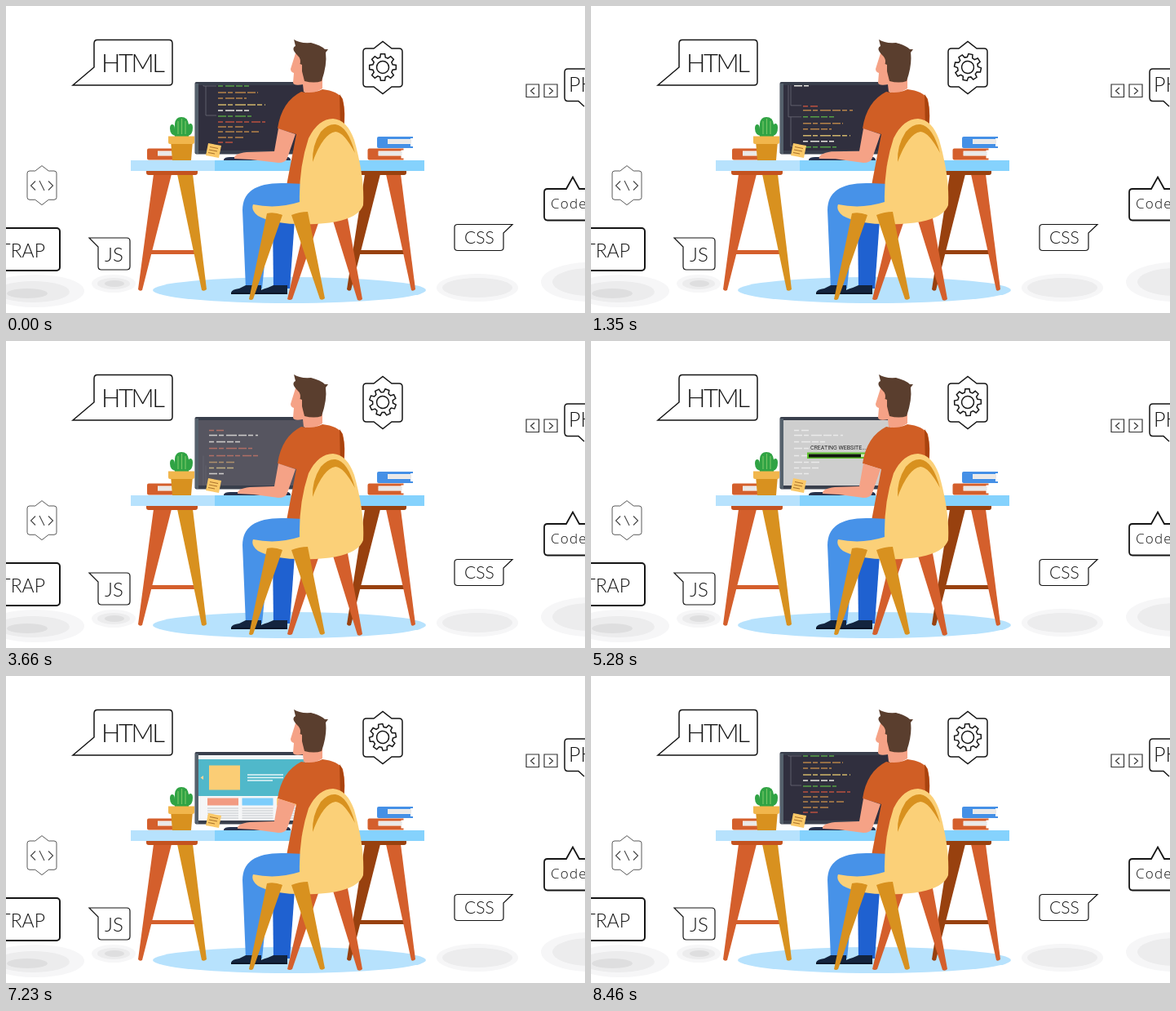
Write an HTML page that moves like this. It is 710x376 px and loops after 8530 ms.

```html
<!DOCTYPE html>
<html lang="en">
<head>
<meta charset="utf-8">
<style>
  html, body { margin: 0; width: 100%; height: 100%; overflow: hidden; background: #fff; }
  svg { display: block; width: 710px; height: 376px; }
  .line { fill: none; stroke: #151515; stroke-width: 1.5; }
  .label { font: 300 24px Lato, "Open Sans", sans-serif; fill: #151515; }
</style>
</head>
<body>
<svg viewBox="0 0 710 376">
  <defs>
    <clipPath id="screen"><path d="M236 97H366V177H236Z"/></clipPath>
    <path id="badge" d="M442 52H451L462 43.500 473 52H482Q486 52 486 56V95Q486 99 482 99H473L462 107.500 451 99H442Q438 99 438 95V56Q438 52 442 52Z"/>
    <g id="book">
      <path d="M2 0H44V2H41V12H44V14H2Q0 14 0 12V2Q0 0 2 0Z"/>
      <path d="M13 3H42V9H13Z" fill="#f3f1ee"/>
      <path d="M13 5H42M13 7H42" stroke="#d3d5d8" stroke-width=".6"/>
    </g>
  </defs>

  <!-- floor and soft shadows -->
  <g fill="#f6f6f7">
    <ellipse cx="36" cy="349" rx="60" ry="20"/>
    <ellipse cx="132" cy="340" rx="27" ry="11"/>
    <ellipse cx="578" cy="345" rx="50" ry="17"/>
    <ellipse cx="716" cy="338" rx="60" ry="24"/>
  </g>
  <g fill="#ececed">
    <ellipse cx="33" cy="350" rx="45" ry="13"/>
    <ellipse cx="132" cy="340" rx="20" ry="7"/>
    <ellipse cx="578" cy="345" rx="43" ry="12"/>
    <ellipse cx="716" cy="338" rx="46" ry="17"/>
  </g>
  <g fill="#dededf">
    <ellipse cx="26" cy="352" rx="25" ry="6"/>
    <ellipse cx="133" cy="340" rx="12" ry="4"/>
  </g>
  <ellipse cx="347.500" cy="348" rx="167.500" ry="16" fill="#b7e2fd"/>

  <!-- bubbles -->
  <g class="line">
    <path d="M82 97 108 75V46Q108 41.500 112 41.500H200Q204 41.500 204 46V93Q204 97 200 97Z"/>
    <use href="#badge"/>
    <use href="#badge" transform="translate(-302.500 163) scale(.75)" stroke="#555" stroke-width="1.300"/>
    <path d="M36 214.500 30.500 220 36 225.500M52 214.500 57.500 220 52 225.500M41 214 47 226" stroke="#444" stroke-width="1.100"/>
    <path d="M102 284H148Q152 284 152 288V319Q152 323 148 323H117Q113 323 113 319V295Z" stroke-width="1.200"/>
    <rect x="-20" y="272" width="86" height="52" rx="4" stroke-width="2"/>
    <path d="M554 267.500H621L610 278V296Q610 299.500 606 299.500H554Q550 299.500 550 296V271Q550 267.500 554 267.500Z" stroke-width="1.200"/>
    <path d="M720 262.500H664Q660 262.500 660 258V228Q660 224 664 224H687L695 209.500 703 224H720" stroke-width="1.800"/>
    <path d="M720 77H689Q685 77 685 81V112Q685 116.500 689 116.500H702L709 123"/>
    <path d="M638 96H653.500V111.500H638ZM660 96H676V111.500H660ZM648 100 643.500 104 648 108M666 100 670.500 104 666 108" stroke="#333" stroke-width="1.200"/>
  </g>
  <g class="label">
    <text x="117" y="81" style="font-size:31px" textLength="78">HTML</text>
    <text x="121" y="313">JS</text>
    <text x="48" y="308" text-anchor="end" style="font-size:23px">TRAP</text>
    <text x="562" y="291" style="font-size:21px">CSS</text>
    <text x="690" y="105" style="font-size:25px">PHP</text>
    <text x="668" y="248" style="font:300 17px 'Open Sans',sans-serif;letter-spacing:1.200px">Code</text>
  </g>
  <g id="gear" class="line">
    <path id="teeth"/>
    <circle r="7.500"/>
  </g>

  <!-- desk legs -->
  <path d="M170 299H234V304H170ZM181 206H203L167 348Q164 350 162 347Z" fill="#d45f2c"/>
  <path d="M210 206H229L246 347Q243 350 240 348Z" fill="#d8911f"/>
  <path d="M172 202H235V204Q235 207 232 207H175Q172 207 172 204Z" fill="#c4521f"/>
  <path d="M426 299H493V304H426ZM440 206H459L423 348Q420 350 418 347Z" fill="#98410f"/>
  <path d="M466 206H484L502 347Q499 350 497 348Z" fill="#d45f2c"/>
  <path d="M432 202H491V204Q491 207 488 207H432Z" fill="#98410f"/>

  <!-- monitor -->
  <rect x="231.500" y="93" width="135" height="88.500" rx="2" fill="#393f4c"/>
  <path d="M232 95V179Q232 181 234 181H236V95Z" fill="#55616c"/>
  <g clip-path="url(#screen)">
    <rect x="236" y="97" width="130" height="80" fill="#302f3e"/>
    <rect id="light" x="236" y="97" width="130" height="80" fill="#cecece"/>
    <g id="code" stroke-width="1.500"></g>
    <g id="pale" stroke-width="1.500"></g>
    <g id="loader">
      <text x="269" y="133" font-family="Roboto,sans-serif" font-size="7" fill="#222">CREATING WEBSITE...</text>
      <rect x="265" y="136.500" width="75" height="7.500" fill="#5fc12f"/>
      <rect x="267" y="138.500" width="71" height="3.500" fill="#cfe9c0"/>
      <rect id="bar" x="267" y="138.500" height="4" fill="#10150d"/>
    </g>
    <g id="site">
      <rect x="236" y="97" width="130" height="80" fill="#f5f6f7"/>
      <path id="hero" d="M236 102H366V147H236Z" fill="#50b8ca"/>
      <g id="banner">
        <path d="M249 109.500H287V139.500H249Z" fill="#fbcd75"/>
        <path d="M242 122 238.500 124.500 242 127Z" fill="#f7d59a"/>
        <path d="M296 121H340M296 124.500H340M296 128H327" stroke="#e5f6f8" stroke-width="1.300"/>
      </g>
      <g id="cards"></g>
    </g>
  </g>
  <path d="M267 188Q268 185 275 185H346Q349 186 349 189H267Z" fill="#26324c"/>

  <!-- desk top and things on it -->
  <path d="M153 189H257V202H153Z" fill="#b7e2fd"/>
  <path d="M256 189H513V202H256Z" fill="#85d2fd"/>
  <use href="#book" x="173" y="174.500" fill="#d45f2c"/>
  <use href="#book" x="455" y="160" fill="#4590e6"/>
  <use href="#book" x="443.500" y="174.500" fill="#d45f2c"/>
  <g fill="#30a344">
    <path d="M207 160V144Q208 136 215 136 223 136 224 145V160Z"/>
    <path d="M201 150Q201 145 204 145 207 145 207 151L212 153V159Q201 160 201 150ZM229 149Q229 144 226 144 223 144 223 151V159Q229 158 229 149Z"/>
  </g>
  <path d="M211 141V157M215.500 138V157M220 141V157" stroke="#76c565" stroke-width="1.200"/>
  <path d="M202 165H229L227 189H204Z" fill="#d8911f"/>
  <path d="M199 159.500H231V167Q231 169 229 169H201Q199 169 199 167Z" fill="#f1b64c"/>
  <path d="M248 168 264 171 261 186 245 183Z" fill="#fbc968"/>
  <path d="M250 172.500 260 174.500M249 176 259 178M248 179.500 256 181" stroke="#a9712b"/>

  <!-- rear chair legs and the man -->
  <path d="M368 263H384L351 359Q348 361 345 359ZM400 260H419L437 359Q434 362 431 360Z" fill="#d45f2c"/>
  <g id="cup">
    <path d="M327 113Q325 118 331 122L339 149 352 146 342 116 334 111Z" fill="#f5a286"/>
    <path d="M324.500 89 341 92.500Q344 93 343 96L336 114Q335 117 332 116L320 112Q317 111 318 108Z" fill="#f7f7f8"/>
    <path d="M325 89 343 93 342 97 324 92Z" fill="#dfe1e5"/>
    <path d="M328 117Q330 113 337 114L341 111 342 118 333 123Z" fill="#f5a286"/>
  </g>
  <path d="M355 58 349 77Q349 81 353 82L352 94Q353 98 364 96L365 105Q376 109 388 101V82L366 58Z" fill="#f5a286"/>
  <path d="M353 41Q360 46 374 45 386 48 391 53L395 53 392 57Q394 72 387 92 378 95 366 92L363 80 360 73Q363 65 357 60 349 52 355 49Z" fill="#5a3e2e"/>
  <path d="M363 72Q357 69 357 76 358 83 363 82Z" fill="#f5a286"/>
  <path d="M362 105Q376 108 388 102 407 104 413 114 417 132 414 150L405 225H343L356 157 333 150Q338 117 362 105Z" fill="#d05e25"/>
  <path d="M409 108Q417 118 414 150L410 152Z" fill="#a9430e"/>
  <path id="arm" fill="#f5a286"/>
  <path d="M327 262H354L348 346H328Z" fill="#1f61d0"/>
  <path d="M343 217Q290 215 290 250L294 346H314L323 257H365V218Z" fill="#4792e8"/>
  <path d="M276 351Q277 347 286 346L294 342H313V352H276ZM310 351Q312 347 321 345L328 342H345V352H310Z" fill="#13243e"/>
  <path d="M276 352H312M310 352H345" stroke="#0a1729" stroke-width="2"/>

  <!-- chair -->
  <path d="M360 240Q359 198 371 162 383 138 401 138 418 139 427 164 440 210 438 244 431 264 380 267 330 269 309 257 300 250 303 243 332 249 360 240Z" fill="#fbd078"/>
  <path d="M376 191Q375 171 386 154 395 144 404 145 419 147 428 180 414 154 404 154 389 156 376 191Z" fill="#d8911f"/>
  <path d="M320 254Q329 252 339 256L303 359Q300 361 298 359ZM350 256Q360 252 370 252L391 358Q388 361 385 359Z" fill="#d8911f"/>
</svg>
<script>
const LOOP = 8530, SPEED = 0.028;
const $ = id => document.getElementById(id);
const clamp = v => Math.max(0, Math.min(1, v));
const smooth = v => v * v * (3 - 2 * v);

// colour key, left, then pairs of line height and right end
const blocks = [
  ["rwwrroyw", 249, 7, 267, 13, 309, 21, 290, 29, 302, 38, 309, 46, 280, 53, 281, 60, 270],
  ["rogooywgrooor", 260, 85, 278, 90, 321, 98, 301, 106, 309, 113, 295, 121, 318, 128, 300,
    135, 301, 142, 318, 148, 291, 154, 310, 161, 291, 167, 278]
];
const tints = { r: "#b9503f", o: "#b68349", y: "#d1b66b", w: "#e7e5df", g: "#55a046" };

function codeLines(color) {
  const guide = `<path d="M245 50V84H258M242 38V98H258M245 98V134H258" fill="none" stroke="#6b6b76" stroke-width=".8"/>`;
  let out = color ? "" : guide;
  for (const [keys, x, ...rows] of blocks)
    [...keys].forEach((key, i) => {
      const dash = i % 2 ? "10 2 6 3 13 2" : "6 3 11 2 8 2";
      out += `<path d="M${x} ${rows[2 * i]}H${rows[2 * i + 1]}" stroke="${color || tints[key]}" stroke-dasharray="${dash}"/>`;
    });
  return out;
}
$("code").innerHTML = codeLines();
$("pale").innerHTML = codeLines("#f1f1f1");

$("cards").innerHTML = ["#f29b82", "#7dcdfb", "#fbcd75"].map((color, i) => {
  const x = 247 + i * 42.5;
  const text = [162, 165, 168, 171, 174].map(y => `M${x} ${y}h38`).join("");
  return `<path d="M${x} 149.500h38v9h-38Z" fill="${color}"/><path d="${text}" stroke="#c3c6ca"/>`;
}).join("");

const points = [];
for (let i = 0; i < 8; i++)
  for (const [r, a] of [[12.5, -15], [16.5, -9], [16.5, 9], [12.5, 15]]) {
    const angle = (i * 45 + a) * Math.PI / 180;
    points.push((r * Math.cos(angle)).toFixed(2) + " " + (r * Math.sin(angle)).toFixed(2));
  }
$("teeth").setAttribute("d", "M" + points.join("L") + "Z");

function draw(now) {
  const t = now % LOOP;
  const ramp = (from, to) => smooth(clamp((t - from) / (to - from)));
  const show = (id, v) => $(id).setAttribute("opacity", v);
  const move = (id, x, y, extra = "") => $(id).setAttribute("transform", `translate(${x} ${y})${extra}`);

  move("gear", 462, 75, ` rotate(${t / LOOP * 360})`);

  const restart = t > 7000;
  const scroll = restart ? 0 : Math.min(t, 3660) * SPEED;
  const fade = restart ? 0 : clamp((t - 3490) / 720);
  move("code", 0, scroll);
  move("pale", 0, scroll);
  show("light", fade);
  show("code", 1 - fade);
  show("pale", fade * 0.8);

  show("loader", restart ? 0 : ramp(3900, 4300));
  $("bar").setAttribute("width", 64 * clamp((t - 4350) / 900));

  show("site", ramp(5300, 5800) * (1 - ramp(7600, 8300)));
  show("hero", ramp(5500, 6000));
  show("banner", ramp(5900, 6500));
  show("cards", ramp(6300, 7050));

  const lift = ramp(1850, 2300) * (1 - ramp(2900, 3400));
  move("cup", 34 * (1 - lift), 62 * (1 - lift));
  show("cup", lift > 0 ? 1 : 0);

  const typing = t < 3500 ? 1 - ramp(3300, 3500) : 0;
  const dx = typing * (-4 + Math.sin(t / 110));
  const dy = -5 * lift + typing * Math.sin(t / 75);
  $("arm").setAttribute("d", `M334 150L355 157 345 186Q343 192 334 192L${304 + dx} ${188 + dy}` +
    ` ${284 + dx} 187Q${283 + dx} 181 ${299 + dx} ${179 + dy}L329 ${178 + dy / 2}Z`);

  requestAnimationFrame(() => draw(performance.now() - start));
}
const start = performance.now();
draw(0);
</script>
</body>
</html>
```
